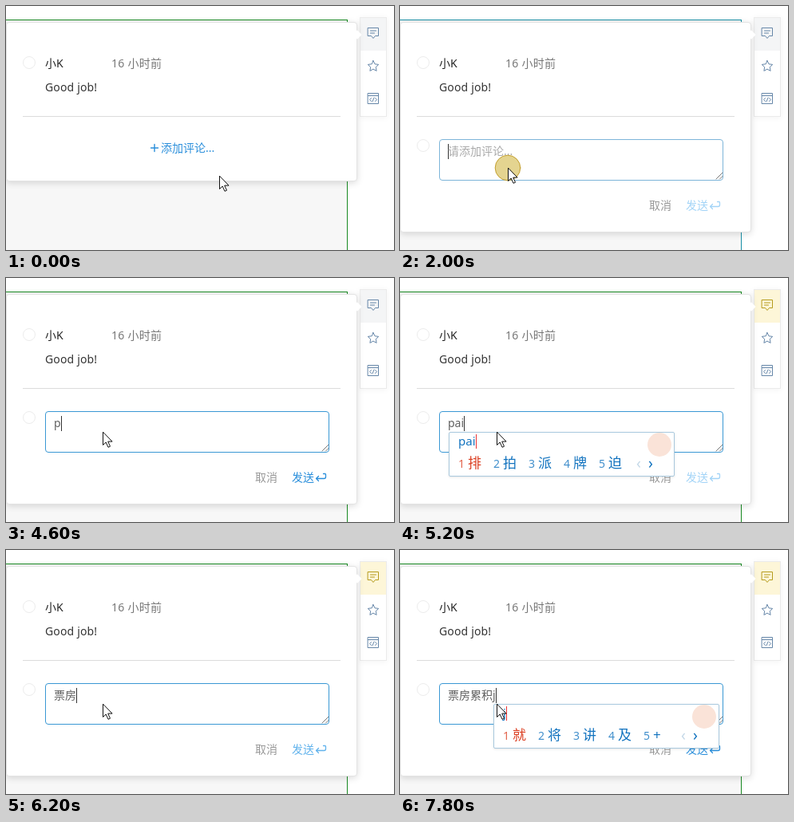
These frames come from a looping animation (486x306 px, 8 s). An HTML page:

```html
<!DOCTYPE html>
<html lang="zh-CN">
<head>
<meta charset="utf-8">
<title>添加评论</title>
<style>
html, body { margin: 0; width: 100%; height: 100%; overflow: hidden; background: #fff; }
#stage {
  position: relative; width: 486px; height: 306px; overflow: hidden;
  font: 14px/20px "Noto Sans", "Noto Sans CJK SC", "Noto Sans CJK", sans-serif; color: #333;
}
#stage > * { position: absolute; box-sizing: border-box; white-space: nowrap; }
#page { left: -2px; top: 17px; width: 430px; height: 300px; background: #f7f7f7; border: 1px solid #188a22; }
#tools { left: 443px; top: 14px; width: 34px; height: 125px; background: #fff; border: 1px solid #ebebeb; box-shadow: 0 1px 8px #0000000d; }
#first { left: 444px; top: 15px; width: 32px; height: 41px; }
#panel { left: 0; top: 20px; width: 440px; background: #fff; border: 1px solid #e3e3e3; border-radius: 4px; box-shadow: 0 2px 9px #00000024; }
#notch { left: 436px; top: 32px; width: 8px; height: 8px; background: #fff; transform: rotate(45deg); }
#rule { left: 21px; top: 138px; width: 398px; height: 1px; background: #dcdcdc; }
.avatar { left: 21px; width: 16px; height: 16px; border: 1px solid #ececec; border-radius: 50%; }
#name { left: 49px; top: 62px; font-weight: 500; color: #222; }
#when { left: 132px; top: 62px; color: #777; letter-spacing: .25px; }
#note { left: 49px; top: 92px; letter-spacing: .15px; }
#add { left: 194px; top: 168px; }
#box { left: 49px; top: 167px; width: 356px; height: 52px; border: 1px solid #3a98d4; border-radius: 4px; background: #fff; }
#field { left: 60px; top: 172px; color: #606060; }
#field i { display: inline-block; width: 1px; height: 19px; margin-right: -1px; background: #333; vertical-align: -5px; }
#cancel { left: 312px; top: 240px; color: #999; }
#send { left: 358px; top: 240px; }
#ime {
  top: 193px; height: 56px; background: #fff; border: 1px solid #a9c9de; border-radius: 2px;
  padding: 0 65px 0 11px; overflow: hidden; color: #1273bf; box-shadow: 0 1px 3px #0000001a;
}
#ime > * { position: absolute; }
#pin { left: 11px; top: 0; font-size: 15px; line-height: 21px; }
#pin i { display: inline-block; width: 1px; height: 18px; background: #e33; vertical-align: -4px; }
#badge { right: 3px; top: 0; width: 30px; height: 30px; border-radius: 50%; background: #fae3d8; }
#hint { right: 34px; top: 1px; font-size: 12px; color: #333; }
#hint b { font-weight: 400; color: #777; }
#ime #cands { position: static; display: flex; gap: 15px; margin-top: 26px; line-height: 24px; font-size: 17px; }
#cands span { min-width: 29px; }
#cands b { display: inline-block; width: 12px; font-size: 14px; font-weight: 400; opacity: .8; }
#cands span:first-child { color: #db3d20; }
#cands svg { vertical-align: -1px; }
#cands .cloud { margin-right: 11px; }
#cands .mark { vertical-align: 5px; }
.turn { top: 26px; font-size: 19px; line-height: 24px; }
svg { fill: none; overflow: visible; stroke-linecap: round; stroke-linejoin: round; }
#stage > svg { left: 0; top: 0; }
</style>
</head>
<body>
<div id="stage">
  <div id="page"></div>
  <div id="tools"></div>
  <div id="first"></div>
  <svg width="486" height="306" stroke="#6586a8" stroke-width="1">
    <path id="chat" d="M453.5 27.5h13v10h-4l-2.5 3-2.5-3h-4zM456.5 31h7M456.5 34h5"/>
    <path d="M460 68.5l2 4.3 4.7.6-3.4 3.3.8 4.7-4.1-2.3-4.1 2.3.8-4.7-3.4-3.3 4.7-.6z"/>
    <path d="M453.5 109.5h13v13h-13zM453.5 112.5h13M457.5 115.5l-2 2 2 2M462.5 115.5l2 2-2 2M461 115l-2 5"/>
  </svg>
  <div id="panel"></div>
  <div id="notch"></div>
  <div class="avatar" style="top:63px"></div>
  <div id="name">小K</div>
  <div id="when">16 小时前</div>
  <div id="note">Good job!</div>
  <div id="rule"></div>

  <div id="add" class="shut">添加评论...</div>
  <svg id="plus" class="shut" width="486" height="306" stroke-width="1.4"><path d="M181.5 178h9M186 173.5v9"/></svg>

  <div class="avatar form" style="top:167px"></div>
  <div id="box" class="form"></div>
  <svg class="form" width="486" height="306" stroke="#777" stroke-width="1"><path d="M396 217l8-8M400.5 217l3.5-3.5"/></svg>
  <div id="field" class="form"></div>
  <div id="cancel" class="form">取消</div>
  <div id="send" class="form">发送</div>
  <svg id="enter" class="form" width="486" height="306" stroke-width="1.3"><path d="M397.5 245.5h2q1 0 1 1v3q0 2-2 2h-10M391.5 248.5l-3 3 3 3"/></svg>

  <div id="ime">
    <div id="badge"></div>
    <div id="pin"></div>
    <div id="hint"><b>9</b> 打开输入工具箱</div>
    <div id="cands"></div>
    <div class="turn" style="right:41px;color:#c5d9e8">‹</div>
    <div class="turn" style="right:26px">›</div>
  </div>

  <svg id="mouse" width="20" height="24">
    <circle id="halo" r="15.8" fill="#d5bd55" fill-opacity=".65" stroke="#c4a030"/>
    <path id="arrow" d="M.5.5v16l3.7-3.5 2.8 6.3 2.5-1.1-2.8-6.1h5z" fill="#fff" stroke="#111"/>
    <path id="hand" d="M-1.5 11V1.5q0-1.5 1.5-1.5t1.5 1.5V7q3-1 3.5 1 2.5-.6 3 1 2.5 0 2.5 2v4q0 3-2 5.5H0l-5.5-7.5q-.5-2.5 2-2z" fill="#fff" stroke="#111"/>
  </svg>
</div>
<script>
const $ = id => document.getElementById(id);
const LOOP = 8000, STEP = 200;
const PALE = '#a3d4f7', MID = '#62b3ec', BLUE = '#2b8fdb';
const CLOUD = '<svg class="cloud" width="18" height="13" stroke="currentColor" stroke-width="1.4"><path d="M5 11.5q-4 0-4-3.5 0-3 3.5-3 1-4 5-4t4.5 4q3 .3 3 3.2 0 3.3-3.5 3.3M12 9q0-2.5-2.5-2.5T7 9t2.5 2.5T12 9"/></svg>';
const MARK = '<svg class="mark" width="12" height="12" stroke="currentColor"><circle cx="7" cy="6" r="4.5"/><path d="M5 6l1.7 1.7L9.5 4.5"/></svg>';

// Each entry changes part of the state and holds until the next one.
const steps = [
  [0, { x: 267, y: 213, text: '', caret: 1, send: PALE, pin: '' }],
  [200, { x: 263, y: 209 }],
  [400, { x: 259, y: 206 }],
  [600, { x: 256, y: 203, hand: 1 }],
  [1000, { x: 241, y: 193, halo: 1 }],
  [1400, { open: 1, halo: 0, hand: 0 }],
  [1600, { x: 200, y: 198 }],
  [1800, { x: 150, y: 203 }],
  [2000, { x: 135, y: 203, halo: 1, teal: 1 }],
  [2200, { x: 121, y: 193, halo: 0, teal: 0 }],
  [2600, { caret: 0 }],
  [3000, { caret: 1, text: 'p', send: MID }],
  [3200, { text: 'pi', send: BLUE }],
  [3400, { text: 'piao' }],
  [3800, { text: 'pia' }],
  [4000, { text: 'pi' }],
  [4200, { text: 'p', caret: 0 }],
  [4600, { caret: 1 }],
  [4800, { text: '', send: MID }],
  [5000, { send: PALE, gold: 1, pin: 'p', list: '跑 平 怕 片 排' }],
  [5200, { pin: 'pai', list: '排 拍 派 牌 迫' }],
  [5400, { pin: "pai'o", list: '拍哦 排 拍 派 牌' }],
  [5600, { pin: "paio'fa", list: '漂发* ~ 拍哦发 排偶 拍哦' }],
  [5800, { pin: "paio'fan", list: '漂饭* ~ 拍哦饭 排偶 拍哦' }],
  [6000, { pin: "paio'fang", list: '票房* ~ 拍哦放 排偶 拍哦' }],
  [6200, { text: '票房', pin: '', send: MID }],
  [6400, { send: BLUE }],
  [6600, { pin: 'l', list: '了 来 里 聊 啦' }],
  [6800, { pin: 'lei', list: '累 类 雷 泪 勒' }],
  [7000, { pin: "lei'j", list: '累积 累计 类聚 累加 雷击', hint: 1 }],
  [7200, { pin: "lei'ji", list: '累积 累计 雷击 累及 累极', hint: 0 }],
  [7400, { text: '票房累积', pin: '' }],
  [7600, { caret: 0 }],
  [7800, { caret: 1, pin: 'j', list: '就 将 讲 及 +' }],
];

const show = (el, on) => el.style.display = on ? '' : 'none';

// In a list, ~ stands for the cloud entry and * for the correction mark.
const candidate = (word, i) =>
  `<span><b>${i + 1}</b>${word.replace('~', CLOUD).replace('*', MARK)}</span>`;

function draw(s) {
  document.querySelectorAll('.form').forEach(el => show(el, s.open));
  document.querySelectorAll('.shut').forEach(el => show(el, !s.open));
  $('panel').style.height = (s.open ? 264 : 200) + 'px';
  $('page').style.borderColor = s.teal ? '#188fa6' : '#188a22';
  $('box').style.borderColor = s.teal ? '#7db5d9' : '#3a98d4';
  $('first').style.background = s.gold ? '#fdf6d8' : '#f4f5f6';
  $('chat').style.stroke = s.gold ? '#b59b1c' : '';
  $('add').style.color = $('plus').style.stroke = s.hand ? '#55adf0' : '#2b8fdb';
  $('send').style.color = $('enter').style.stroke = s.send;

  const typed = s.text + s.pin.replace("'", '');
  const caret = s.caret ? '<i></i>' : '';
  $('field').innerHTML = typed ? typed + caret : caret + '<span style="color:#aaa">请添加评论...</span>';

  show($('ime'), s.pin);
  if (s.pin) {
    $('ime').style.left = 61 + s.text.length * 14 + 'px';
    $('pin').innerHTML = s.pin + '<i></i>';
    $('cands').innerHTML = s.list.split(' ').map(candidate).join('');
    show($('hint'), s.hint);
  }

  $('mouse').style.transform = `translate(${s.x}px, ${s.y}px)`;
  show($('halo'), s.halo);
  show($('hand'), s.hand);
  show($('arrow'), !s.hand);
}

let last = -1;
function tick(now) {
  const t = Math.floor(now % LOOP / STEP) * STEP;
  if (t !== last) {
    last = t;
    draw(Object.assign({}, ...steps.filter(([at]) => at <= t).map(([, part]) => part)));
  }
  requestAnimationFrame(tick);
}
tick(performance.now());
</script>
</body>
</html>
```
